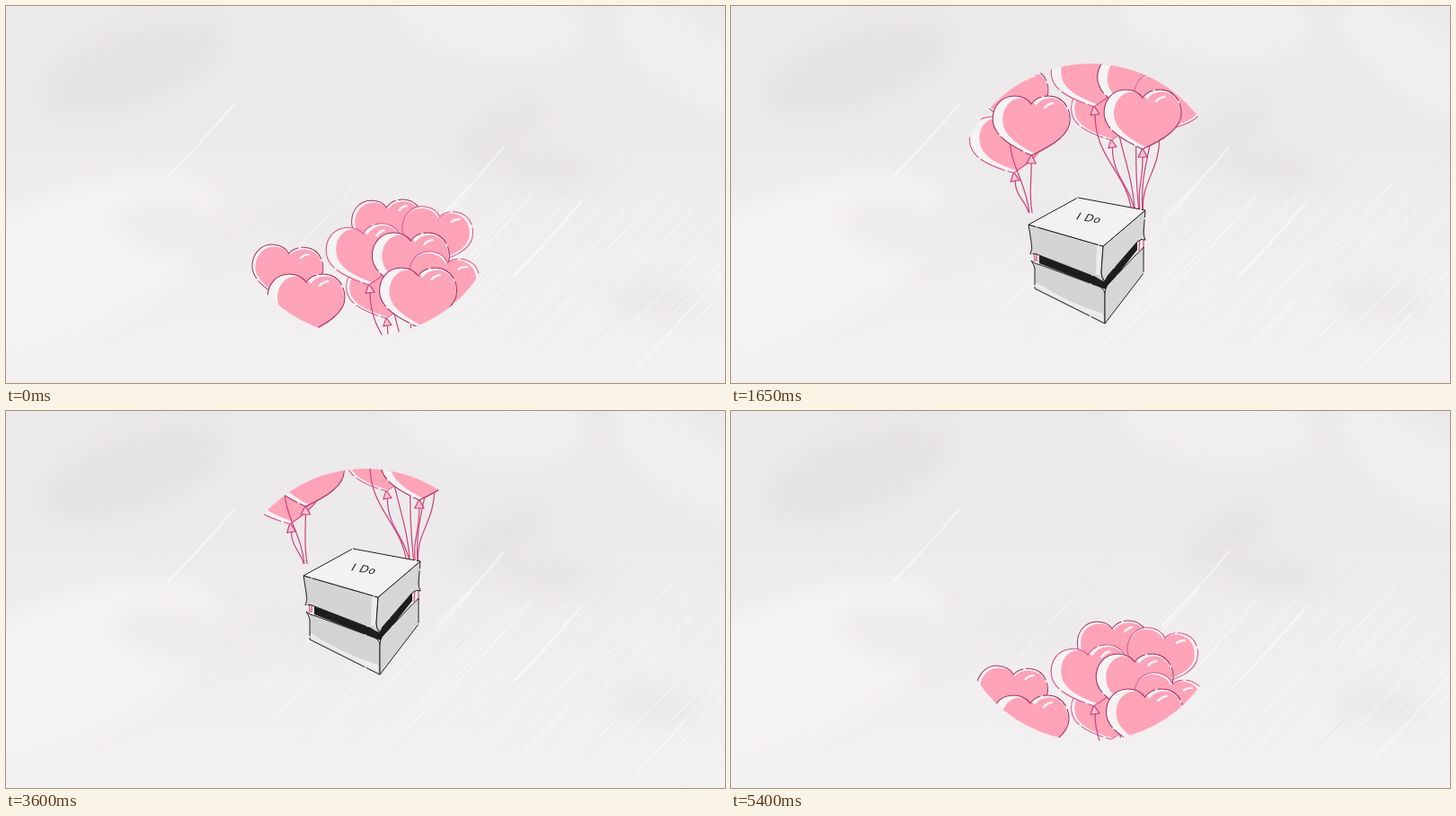
Recreate the animation shown at these times as an HTML page with a canvas. Size 800 px wide and 419 px high, loop 5550 ms.

```html
<!DOCTYPE html>
<html lang="en">
<head>
<meta charset="utf-8">
<title>Balloon box</title>
<style>
  html, body { margin: 0; width: 100%; height: 100%; overflow: hidden; background: #f0eeef; }
  canvas { display: block; }
</style>
</head>
<body>
<canvas id="stage" width="800" height="419"></canvas>
<script>
const W = 800, H = 419, STEP = 150, STEPS = 37;
const ctx = document.getElementById('stage').getContext('2d');
const PINK = '#ffa3b8', WHITE = '#f6f3f4', WINE = '#a53462', ROSE = '#dc5085', INK = '#222';
const tone = v => `rgb(${v},${v - 3},${v - 2})`;

// Soft feather backdrop, painted once
const backdrop = document.createElement('canvas');
backdrop.width = W;
backdrop.height = H;
paintBackdrop(backdrop.getContext('2d'));

function paintBackdrop(g) {
  const sky = g.createLinearGradient(0, 0, 0, H);
  [236, 237, 241, 243].forEach((v, i) => sky.addColorStop(i / 3, tone(v)));
  g.fillStyle = sky;
  g.fillRect(0, 0, W, H);

  // x, y, radius, turn, tone
  const patches = [
    [140, 70, 105, -.35, 229], [550, 140, 55, -.6, 230], [600, 180, 55, .1, 231],
    [540, 15, 110, .1, 241], [760, 60, 100, .6, 241], [60, 290, 190, -.4, 246],
    [200, 250, 80, .2, 238], [350, 240, 90, .1, 237], [725, 328, 50, .1, 235]
  ];
  g.filter = 'blur(12px)';
  for (const [x, y, r, turn, v] of patches) {
    g.fillStyle = tone(v);
    g.beginPath();
    g.ellipse(x, y, r, r * .4, turn, 0, 7);
    g.fill();
  }
  g.filter = 'none';

  let seed = 7;
  const rnd = () => (seed = seed * 16807 % 2147483647) / 2147483647;
  const barb = (x, y, len, alpha) => {
    g.globalAlpha = alpha;
    g.beginPath();
    g.moveTo(x, y);
    g.quadraticCurveTo(x + len * .5, y - len * .5, x + len, y - len * 1.1);
    g.stroke();
  };
  for (let i = 0; i < 90; i++) {
    g.strokeStyle = i % 3 ? '#fff' : tone(228);
    g.lineWidth = .6 + rnd() * 1.2;
    barb(240 + rnd() * 520, 260 + rnd() * 160, 40 + rnd() * 80, .15 + rnd() * .2);
  }
  g.strokeStyle = '#fff';
  g.lineWidth = 2;
  for (const [x, y] of [[180, 190], [480, 238], [565, 300]]) barb(x, y, 75, .5);
}

const heart = new Path2D('M0-24C-4-30-11-33-19-33C-33-33-43-22-43-7C-43 10-24 22 0 33C24 22 43 10 43-7C43-22 33-33 19-33C11-33 4-30 0-24Z');
const shine = new Path2D('M15-20Q18-24 24-25');
const knot = new Path2D('M0 32L-5 42L5 42Z');

// x, y, turn, swing, front row; listed back to front
const balloons = [
  [309, 153, -.16, 4, true], [313, 99, .09, -1, false], [334.5, 133, 0, -2.5, true],
  [424, 48, -.04, 2, false], [479, 58, .17, 0, false], [419, 119, -.14, 0, false],
  [400, 79, -.12, 0, true], [451, 87, 0, -3, true], [486, 109, .24, 0, false],
  [457.5, 126, 0, 5, true]
];

function balloon([x0, y, turn, swing, front], sway) {
  const x = x0 + swing * sway, size = front ? 1 : .92;
  const rim = front ? .14 : turn > .1 ? -.05 : .05;
  const line = Math.abs(turn) > .1 ? ROSE : WINE;

  // The string runs from the knot to the lid
  const sx = x - 42 * size * Math.sin(turn), sy = y + 42 * size * Math.cos(turn);
  const ex = x0 < 380 ? 333 + (x0 - 320) * .15 : 445 + (sx - 400) * .18;
  const drop = 230 - sy;
  ctx.strokeStyle = '#cc4078';
  ctx.lineWidth = 1.2;
  ctx.beginPath();
  ctx.moveTo(sx, sy);
  ctx.bezierCurveTo(sx, sy + drop * .45, ex - 4, sy + drop * .6, ex, 230);
  ctx.stroke();

  ctx.save();
  ctx.translate(x, y);
  ctx.rotate(turn);
  ctx.scale(size, size);
  ctx.fillStyle = '#fbc3d0';
  ctx.fill(knot);
  ctx.stroke(knot);
  ctx.fillStyle = WHITE;
  ctx.fill(heart);
  ctx.save();
  ctx.translate(rim * 36, .5);
  ctx.scale(1 - Math.abs(rim), .94);
  ctx.fillStyle = PINK;
  ctx.fill(heart);
  ctx.restore();
  ctx.strokeStyle = line;
  ctx.lineWidth = 1.1;
  ctx.setLineDash([80, 3, 30, 3]);
  ctx.stroke(heart);
  ctx.setLineDash([]);
  ctx.strokeStyle = WHITE;
  ctx.lineWidth = 2.6;
  ctx.lineCap = 'round';
  ctx.stroke(shine);
  ctx.restore();
}

const shape = (d, fill, line) => ({ path: new Path2D(d), fill, line });
const box = [
  shape('M343 274L412 300L452 260V271L417 315L343 286Z', '#1d1d1d'),
  shape('M334 283Q338 287 345 288L410 312Q417 315 416 323V353L338 314V292Q337 287 334 283Z', '#d3d3d3', INK),
  shape('M339 307Q375 330 414 342L415 351L339 313Z', '#ececec'),
  shape('M416 353L459 297V268Q455 273 450 277L420 309Q416 313 416 322Z', '#d6d6d6', INK),
  shape('M331 243L414 267L412 296Q412 302 416 307Q411 305 405 301L343 277Q337 274 333 276Q336 270 334 262Z', '#d4d4d4', INK),
  shape('M407 266L413 268L411 299L406 298Z', '#ececec'),
  shape('M414 267L461 227L459 251Q459 256 461 260Q456 258 452 262L419 300L416 306Q412 302 412 296Z', '#d6d6d6', INK),
  shape('M386 213L461 227L414 267L331 243Z', '#f3f1f2', INK)
];
const sideStrings = new Path2D('M335 242L338 284M340 268V284M455 255L454 272M459 226V270');

function scene(dx, y, sway) {
  ctx.save();
  ctx.translate(dx, y - 213);
  balloons.forEach(b => balloon(b, sway));
  ctx.strokeStyle = ROSE;
  ctx.lineWidth = 1.3;
  ctx.stroke(sideStrings);
  ctx.lineWidth = 1;
  ctx.strokeStyle = INK;
  ctx.setLineDash([70, 2]);
  for (const { path, fill, line } of box) {
    ctx.fillStyle = fill;
    ctx.fill(path);
    if (line) ctx.stroke(path);
  }
  ctx.setLineDash([]);
  ctx.transform(1, .17, -.5, .85, 383, 237);
  ctx.fillStyle = INK;
  ctx.font = '12.5px Lato, sans-serif';
  ctx.letterSpacing = '1px';
  ctx.fillText('I Do', 0, 0);
  ctx.restore();
}

// Steady rise, a hover in the middle, then up and away
const RISE = 18, HOVER = 12, LEAVE = 21.5;
const height = n => n < HOVER ? 411 - RISE * n : 202.5 - 19.8 * Math.max(0, n - LEAVE);

function frame(now) {
  const n = Math.floor(now / STEP) % STEPS;
  const sway = .5 + .5 * Math.cos(2 * Math.PI * (n - 4) / 11.5);
  const drift = n >= HOVER && n < LEAVE ? -2 * sway : 0;
  ctx.drawImage(backdrop, 0, 0);
  ctx.save();
  ctx.beginPath();
  ctx.arc(400, 215.5, 151.5, 0, 7);
  ctx.clip();
  scene(drift, height(n), sway);
  scene(0, height(n - STEPS), sway);
  ctx.restore();
}

const start = performance.now();
function tick() {
  frame(performance.now() - start);
  requestAnimationFrame(tick);
}
tick();
</script>
</body>
</html>
```
